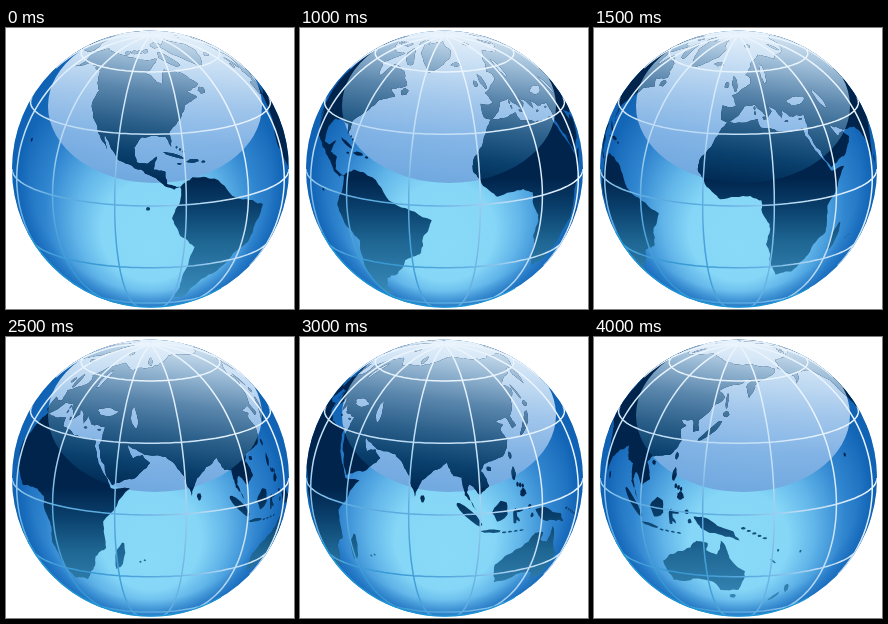
Recreate the animation shown at these times as an HTML page. Size 288x281 px, loop 4.5 s.

```html
<!DOCTYPE html>
<html lang="en">
<head>
<meta charset="utf-8">
<title>Turning globe</title>
<style>
html, body { margin: 0; width: 100%; height: 100%; overflow: hidden; background: #fff; }
svg { display: block; width: 100vw; height: 100vh; }
</style>
</head>
<body>
<svg viewBox="0 0 288 281">
  <defs>
    <radialGradient id="sea" gradientUnits="userSpaceOnUse" cx="145" cy="170" r="137" fx="145" fy="222">
      <stop offset="0" stop-color="#89daf8"/>
      <stop offset=".36" stop-color="#86d7f7"/>
      <stop offset=".55" stop-color="#62b6e9"/>
      <stop offset=".77" stop-color="#3186d0"/>
      <stop offset="1" stop-color="#1467b7"/>
    </radialGradient>
    <radialGradient id="rim" gradientUnits="userSpaceOnUse" cx="144.5" cy="141" r="138.5">
      <stop offset=".88" stop-color="#0a5cb0" stop-opacity="0"/>
      <stop offset="1" stop-color="#0a5cb0" stop-opacity=".5"/>
    </radialGradient>
    <linearGradient id="seaGloss" gradientUnits="userSpaceOnUse" x1="158" y1="2" x2="145" y2="155">
      <stop offset="0" stop-color="#f6fbff"/>
      <stop offset=".2" stop-color="#d6e8f8"/>
      <stop offset=".46" stop-color="#aaccee"/>
      <stop offset=".72" stop-color="#86b5e6"/>
      <stop offset="1" stop-color="#6fa6de"/>
    </linearGradient>
    <linearGradient id="dark" gradientUnits="userSpaceOnUse" x1="0" y1="150" x2="0" y2="275">
      <stop offset="0" stop-color="#00244c"/>
      <stop offset=".24" stop-color="#0a406c"/>
      <stop offset=".5" stop-color="#1e6592"/>
      <stop offset="1" stop-color="#3d90c0"/>
    </linearGradient>
    <linearGradient id="landGloss" gradientUnits="userSpaceOnUse" x1="165" y1="5" x2="145" y2="155">
      <stop offset="0" stop-color="#d4e5f3"/>
      <stop offset=".2" stop-color="#96b7d3"/>
      <stop offset=".4" stop-color="#5a86ac"/>
      <stop offset=".62" stop-color="#2a5f8a"/>
      <stop offset=".82" stop-color="#0a406d"/>
      <stop offset="1" stop-color="#002b55"/>
    </linearGradient>
    <radialGradient id="wire" gradientUnits="userSpaceOnUse" cx="80" cy="250" r="220">
      <stop offset="0" stop-color="#2f94d0"/>
      <stop offset=".4" stop-color="#62aee2"/>
      <stop offset=".65" stop-color="#b9daf4"/>
      <stop offset="1" stop-color="#eaf4fd"/>
    </radialGradient>
    <clipPath id="ball"><circle cx="144.5" cy="141" r="138.5"/></clipPath>
    <clipPath id="lens"><ellipse cx="149" cy="78" rx="107" ry="77"/></clipPath>
    <path id="land"/>
  </defs>
  <g clip-path="url(#ball)">
    <rect width="288" height="281" fill="url(#sea)"/>
    <circle cx="144.5" cy="141" r="138.5" fill="url(#rim)"/>
    <ellipse cx="149" cy="78" rx="107" ry="77" fill="url(#seaGloss)" opacity=".94"/>
    <use href="#land" fill="url(#dark)"/>
    <g clip-path="url(#lens)"><use href="#land" fill="url(#landGloss)"/></g>
    <path id="grid" fill="none" stroke="url(#wire)" stroke-width="1.5"/>
  </g>
  <path d="M22 204A138 138 0 0 0 215 260" fill="none" stroke="#1f97d6" stroke-width="1.3"/>
</svg>
<script>
const CX = 144.5, CY = 141, R = 138.5, RAD = Math.PI / 180;
const GRID_TILT = 15.5, LAND_TILT = 16.3, STEP = 500, FRAMES = 9;
const shapes = [];

let seed = 11;
function rnd() {
  seed = (seed * 16807) % 2147483647;
  return seed / 2147483647;
}

// Midpoint displacement turns one edge into a ragged shore
function shore(a, b, depth, out) {
  if (!depth) { out.push(a); return; }
  const dx = b[0] - a[0], dy = b[1] - a[1];
  const k = (rnd() - .5) * .22 * Math.min(1, 8 / Math.hypot(dx, dy));
  const mid = [(a[0] + b[0]) / 2 - dy * k, (a[1] + b[1]) / 2 + dx * k];
  shore(a, mid, depth - 1, out);
  shore(mid, b, depth - 1, out);
}

// Key points as lon, lat pairs, clockwise
function coast(...c) {
  const out = [];
  for (let i = 0; i < c.length; i += 2) {
    const j = (i + 2) % c.length;
    shore([c[i], c[i + 1]], [c[j], c[j + 1]], 3, out);
  }
  shapes.push(out);
}

// Ragged ellipse; anticlockwise ones cut a hole
function isle(lon, lat, w, h = w, slant = 0, turn = -1) {
  const pts = [], c = Math.cos(slant * RAD), s = Math.sin(slant * RAD);
  for (let i = 0; i < 14; i++) {
    const a = turn * i * Math.PI / 7, k = .82 + .36 * rnd();
    const x = w * k * Math.cos(a), y = h * k * Math.sin(a);
    pts.push([lon + x * c - y * s, lat + x * s + y * c]);
  }
  shapes.push(pts);
}

const lake = (lon, lat, w, h, slant) => isle(lon, lat, w, h, slant, 1);

function chain(n, lon, lat, dLon, dLat, w, h) {
  for (let i = 0; i < n; i++) isle(lon + i * dLon, lat + i * dLat, w, h);
}

// North America
coast(-167,66, -156,71, -128,70, -95,68, -82,69, -94,60, -82,54, -78,62, -64,59, -56,52, -66,49.5,
  -61,46, -70,43, -76,36, -81,31, -80.5,25.3, -83,29.8, -94,29.5, -97.5,25, -96,19, -91.5,18.5, -87,21.4,
  -88.5,16, -83.5,15, -83,10, -77.5,8.5, -80,7.4, -86,11, -94,16, -105,20, -113,31, -110,23.5, -117,32.5,
  -124.3,41, -124,48.5, -135,58.5, -148,60.5, -163,55, -158,59);
coast(-73,78, -35,83.5, -20,75, -24,69, -43,60, -53,67);
isle(-72, 68.5, 11, 2.8, -25);
isle(-80, 79.5, 12, 2.4);
chain(4, -122, 72, 8, .8, 4, 1.4);
isle(-56, 49, 2.4, 1.7);
isle(-79.5, 21.7, 5, .6, -18);
isle(-71, 18.9, 2.7, .8);
chain(2, -77.3, 18.1, 11, 0, .9, .4);
chain(3, -78, 25, 1.5, -1, .4, .5);
isle(-91, -.5, .8);
isle(-155.5, 19.6, .8);

// South America
coast(-77.5,8.5, -72,12, -62,10.5, -50,0, -35.3,-5.5, -39,-13, -41,-22, -48.5,-26, -54,-34.5, -62,-39,
  -66,-46, -68,-53.5, -74,-52, -73.5,-38, -70.3,-19, -76,-14, -81,-5, -77.5,3);

// Africa
coast(-6,35.8, 10,37.2, 11,33.5, 20,31, 32.5,31, 37.3,20, 43,11.5, 51.2,11.8, 40,-3, 40.6,-15, 35,-20,
  32.5,-27, 27,-33.8, 19,-34.6, 15,-27, 12,-17, 13.5,-10, 9.5,-1, 9.5,3, 5,5, -7.6,3.5, -13.5,8.5,
  -17.6,14.7, -16.5,21, -10,30);
isle(46.5, -19, 1.9, 6.3, -15);
chain(2, 55.5, -21, 2, .8, .5);

// Europe and Asia
coast(-9,37, -9,43.5, -1.5,43.5, -4,48.4, 8,54, 9,57, 5.5,59, 12,65.5, 25,71, 42,67, 73,72, 104,77.5,
  140,72.5, 180,69, 190,66, 178,62, 163,58, 157,51.5, 156,57.5, 163,61.5, 136,55, 141,52, 128,40, 129.3,35.3,
  126.5,34.6, 125,39.5, 118,39, 122,36.8, 119.5,35, 121.8,30.5, 117,23.5, 108,21.5, 106,18.5, 109.2,12,
  105,8.7, 100.5,13.4, 99.5,10, 104,1.5, 98.5,9, 97.5,16.5, 94,17, 91,22.6, 80.2,15, 77.5,8.1, 72.8,19,
  67,25, 57,26, 49,30, 52,24.3, 56.3,25.8, 59.8,22.5, 52,15.6, 43.5,12.7, 34.8,28.5, 36,36.5, 27.5,37,
  24,40.5, 23,36.5, 19.5,41.5, 13.5,45.6, 18.3,40.2, 16,38, 9,44, 3,43, -.3,38.8, -5.5,36);
lake(35, 43.5, 6, 1.8);
lake(51, 42, 1.9, 4.6, 15);
lake(20, 59.5, 2, 5.5, -12);
isle(-2.5, 54, 1.7, 4.2, 15);
isle(-8, 53.3, 1.6);
isle(-19, 65, 4.3, 1.3);
isle(18, 78.5, 6, 1.5);
isle(60, 73.5, 3, 3);
chain(2, 9, 40, 0, 2.2, .5, .9);
isle(14, 37.5, 1.4, .7);
chain(2, 25, 35.2, 8, 0, 1, .4);
isle(80.8, 7.5, .9, 1.6);

// East and south-east Asian islands
isle(136, 36, 7, 1.3, 40);
isle(143, 43.5, 1.8, 1.3);
isle(142.7, 50, .8, 3.8);
isle(121, 23.7, .7, 1.5);
isle(109.8, 19.2, 1);
isle(121.2, 16, 1, 2.6);
chain(3, 122.5, 11.3, 1.3, -.5, .6, 1);
isle(125, 7.5, 1.6);
isle(101, 0, 7.4, 1.5, -45);
isle(110, -7.4, 4.4, .7, -6);
isle(114, 1, 3.2, 4.3, -30);
isle(120.7, -2, .9, 3.4);
isle(122.5, 0, 2.4, .5);
isle(122, -3.4, 1.6, .6, -50);
chain(4, 115.8, -8.5, 2.8, -.1, 1, .4);
chain(2, 128, 1, 1.3, -4, .8, 1);
coast(131,-.8, 138,-1.7, 147.8,-6.3, 150.5,-10.5, 138.5,-7.5, 133,-4);
chain(5, 152, -5, 2.3, -1.2, .9, .5);

// Australia and the south-west Pacific
coast(142.5,-10.7, 146,-19, 153,-26, 150,-37.5, 140.5,-38, 137.8,-33, 131,-31.5, 124,-33.5, 115.5,-34.5,
  113.5,-24, 122,-18, 129,-15, 132,-11.5, 136.8,-12.2, 136,-15.5, 140.5,-17.5);
isle(146.7, -42, 1.7, 1.4);
isle(176, -38.5, 1.2, 3, 15);
isle(170.5, -43.8, 1.1, 3.8, -40);
isle(165.5, -21.3, 1.8, .4, -40);
chain(2, 167.3, -16, 10.7, -1.8, .5, .7);

function project(lon, lat, lon0, tilt) {
  const a = (lon - lon0) * RAD, b = lat * RAD, t = tilt * RAD;
  const s = Math.sin(b), c = Math.cos(b) * Math.cos(a);
  return [
    Math.cos(b) * Math.sin(a),
    s * Math.cos(t) - c * Math.sin(t),
    s * Math.sin(t) + c * Math.cos(t)
  ];
}

const place = (x, y) => (CX + R * x).toFixed(1) + " " + (CY - R * y).toFixed(1);

// Points beyond the horizon slide out to the limb
function outline(pts, lon0) {
  const p = pts.map(([lon, lat]) => project(lon, lat, lon0, LAND_TILT));
  if (p.every(v => v[2] < 0)) return "";
  return "M" + p.map(([x, y, z]) => {
    const k = z < 0 ? 1 / Math.hypot(x, y) : 1;
    return place(x * k, y * k);
  }).join("L") + "Z";
}

function line(at, from, to) {
  let d = "", pen = "M";
  for (let t = from; t <= to; t += 3) {
    const [x, y, z] = project(...at(t), 0, GRID_TILT);
    if (z < 0) { pen = "M"; continue; }
    d += pen + place(x, y);
    pen = "L";
  }
  return d;
}

let wires = "";
for (let lat = -60; lat <= 60; lat += 30) wires += line(t => [t, lat], -180, 180);
for (let lon = 15; lon < 375; lon += 30) wires += line(t => [lon, t], -90, 90);
document.getElementById("grid").setAttribute("d", wires);

const landPath = document.getElementById("land");
let shown = -1;

function draw(ms) {
  const i = Math.floor(ms / STEP) % FRAMES;
  if (i === shown) return;
  shown = i;
  landPath.setAttribute("d", shapes.map(s => outline(s, -90 + 30 * i)).join(""));
}

function tick() {
  draw(performance.now());
  requestAnimationFrame(tick);
}
tick();
</script>
</body>
</html>
```
